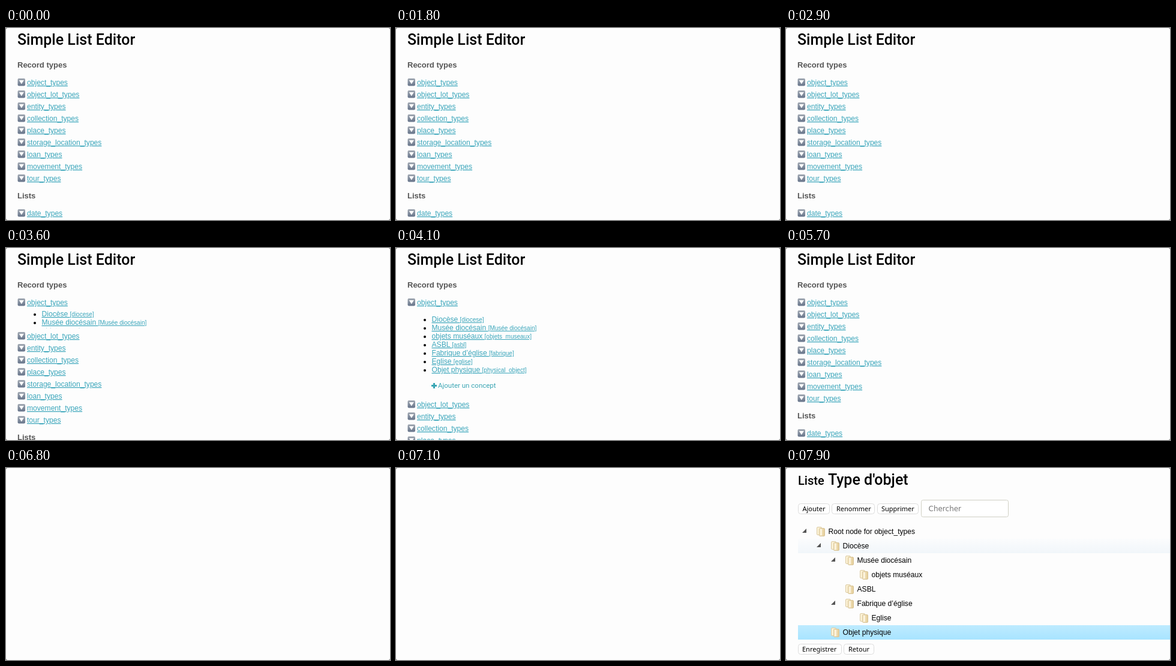
Write an HTML page that moves like this. It is 640 px wide and 320 px high and loops after 8000 ms.

```html
<!DOCTYPE html>
<html lang="fr">
<head>
<meta charset="utf-8">
<title>Simple List Editor</title>
<style>
  html, body { margin: 0; width: 100%; height: 100%; overflow: hidden; background: #777; }
  svg { display: block; width: 640px; height: 320px; }
  text { font: 12.1px "Liberation Sans", Arial, sans-serif; fill: #000; white-space: pre; }
  .title { font: 500 25px Roboto, sans-serif; }
  .small { font-size: 20px; }
  .head { font-weight: bold; font-size: 13px; fill: #555; }
  .link { fill: #3ba6bb; text-decoration: underline; text-decoration-skip-ink: none; }
  .code { font-size: 10px; }
  .add { font: 11.5px Roboto, sans-serif; fill: #3ba6b4; }
  .btn { font: 11px "Noto Sans", sans-serif; }
  .hint { font: 12px "DejaVu Sans", sans-serif; fill: #777; }
</style>
</head>
<body>
<svg id="stage" viewBox="0 0 640 320">
  <defs>
    <linearGradient id="grey" x2="0" y2="1">
      <stop offset="0" stop-color="#a3aab4"/><stop offset="1" stop-color="#66748a"/>
    </linearGradient>
    <linearGradient id="gold">
      <stop offset="0" stop-color="#fbf1d4"/><stop offset="1" stop-color="#e3cb94"/>
    </linearGradient>
    <linearGradient id="hover" x2="0" y2="1">
      <stop offset="0" stop-color="#fbfcfd"/><stop offset="1" stop-color="#f1f6fa"/>
    </linearGradient>
    <linearGradient id="picked" x2="0" y2="1">
      <stop offset="0" stop-color="#beebff"/><stop offset="1" stop-color="#a8e4ff"/>
    </linearGradient>
    <clipPath id="fold"><rect id="foldBox" x="16" y="100" width="624" height="0"/></clipPath>
  </defs>
  <rect width="640" height="320" rx="3" fill="#fdfdfd"/>
</svg>
<script>
const LOOP = 8000, STEP = 100, SLIDE = 400;
const OPEN = 3470, CLOSE = 5156, LEAVE = 6450, ARRIVE = 7200;
const FULL = 150, MARGIN = 12.3;
const stage = document.getElementById("stage");
const foldBox = document.getElementById("foldBox");

function add(parent, tag, attrs, content) {
  const el = document.createElementNS("http://www.w3.org/2000/svg", tag);
  for (const k in attrs) el.setAttribute(k, attrs[k]);
  if (content) el.textContent = content;
  parent.appendChild(el);
  return el;
}
const group = (parent, attrs) => add(parent, "g", attrs);
const label = (parent, x, y, cls, s) => add(parent, "text", { x, y, class: cls }, s);
const rect = (parent, x, y, width, height, fill, more) =>
  add(parent, "rect", { x, y, width, height, fill, ...more });
const path = (parent, d, fill) => add(parent, "path", { d, fill });

// Overview page
const overview = group(stage);
label(overview, 19, 28, "title", "Simple List Editor");
label(overview, 19, 66, "head", "Record types");

function typeRow(parent, y, name) {
  rect(parent, 19.5, y - 7, 12.5, 12.5, "url(#grey)", { rx: 2 });
  path(parent, `M21.8 ${y - 4}h8l-4 6.5z`, "#fff");
  label(parent, 35, y + 4, "link", name);
}
typeRow(overview, 91, "object_types");

const below = group(overview);
["object_lot", "entity", "collection", "place", "storage_location", "loan", "movement", "tour"]
  .forEach((name, i) => typeRow(below, 111 + 20 * i, name + "_types"));
label(below, 19, 284, "head", "Lists");
typeRow(below, 309, "date_types");

const fold = group(overview, { "clip-path": "url(#fold)" });
const list = group(fold);
[
  ["Diocèse", "diocese"], ["Musée diocésain", "Musée diocésain"],
  ["objets muséaux", "objets_museaux"], ["ASBL", "asbl"],
  ["Fabrique d’église", "fabrique"], ["Eglise", "eglise"],
  ["Objet physique", "physical_object"]
].forEach(([name, code], i) => {
  const y = 119 + 14 * i;
  add(list, "circle", { cx: 48, cy: y + 1, r: 2, fill: "#000" });
  const t = label(list, 59.5, y + 4, "link", name + " ");
  add(t, "tspan", { class: "code" }, `[${code}]`);
});
path(list, "M62 225h3v3h3v3h-3v3h-3v-3h-3v-3h3z", "#3ba6b4");
label(list, 70, 233, "add", "Ajouter un concept");

// Tree page
const editor = group(stage);
label(editor, 20, 28, "title small", "Liste");
label(editor, 70, 28, "title", "Type d'objet");

function button(x, y, w, textX, s) {
  rect(editor, x + .5, y + .5, w, 17, "#fff", { rx: 4, stroke: "#dcdcdc" });
  label(editor, textX, y + 13, "btn", s);
}
button(20, 59, 52, 27.5, "Ajouter");
button(76, 59, 71, 84, "Renommer");
button(152, 59, 68, 159, "Supprimer");
button(20, 293, 72, 27, "Enregistrer");
button(96, 293, 50, 104, "Retour");
rect(editor, 225.5, 53.5, 145, 28, "#fff", { rx: 3, stroke: "#d0d0c4" });
label(editor, 237.5, 72, "hint", "Chercher");

rect(editor, 20, 118, 620, 24, "url(#hover)");
rect(editor, 20, 262, 620, 24, "url(#picked)");
[
  [0, "Root node for object_types", 1], [1, "Diocèse", 1],
  [2, "Musée diocésain", 1], [3, "objets muséaux"], [2, "ASBL"],
  [2, "Fabrique d’église", 1], [3, "Eglise"], [1, "Objet physique"]
].forEach(([depth, name, open], i) => {
  const x = 24 * depth, y = 106 + 24 * i;
  if (open) path(editor, `M${x + 34} ${y - 5}v7h-7z`, "#555");
  rect(editor, x + 51.5, y - 7.5, 8, 13, "#fbf1d4", { rx: 1.5, stroke: "#dccba4" });
  rect(editor, x + 55.5, y - 5.5, 9, 13, "url(#gold)", { rx: 1.5, stroke: "#d8c498" });
  path(editor, `M${x + 58} ${y - 4}h1.5v10h-1.5z`, "#fffaf0");
  label(editor, x + 70.5, y + 4, "", name);
});

function swing(t) {
  const k = Math.min(1, Math.max(0, t / SLIDE));
  return .5 - .5 * Math.cos(Math.PI * k);
}

function draw(now) {
  const t = Math.floor((now % LOOP) / STEP) * STEP;
  const p = swing(t - OPEN) - swing(t - CLOSE);
  const shift = FULL * p;
  const bottom = 100.5 + shift - MARGIN * p;

  overview.style.display = t < LEAVE ? "" : "none";
  editor.style.display = t >= ARRIVE ? "" : "none";
  fold.style.display = p > .001 ? "" : "none";
  below.setAttribute("transform", `translate(0 ${Math.round(shift)})`);
  list.setAttribute("transform", `translate(0 ${Math.round(MARGIN * (p - 1))})`);
  foldBox.setAttribute("height", Math.max(0, bottom - 100));
}

const start = performance.now();
function tick() {
  draw(performance.now() - start);
  requestAnimationFrame(tick);
}
draw(0);
requestAnimationFrame(tick);
</script>
</body>
</html>
```
